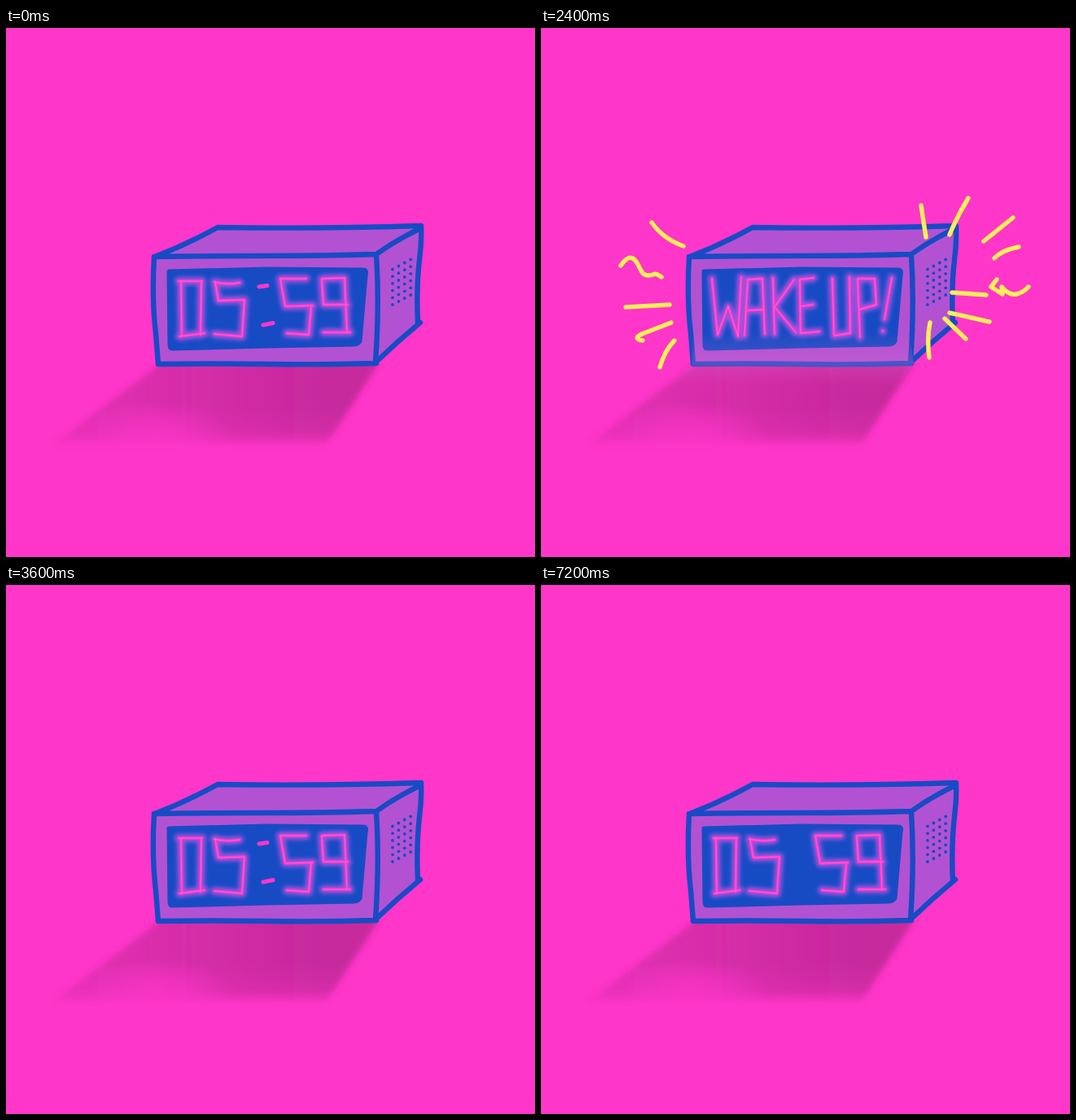
Write an HTML page that moves like this. It is 650x650 px and loops after 7.6 s.

```html
<!DOCTYPE html>
<html lang="en">
<head>
<meta charset="utf-8">
<title>Alarm clock</title>
<style>
  html, body { margin: 0; width: 100%; height: 100%; overflow: hidden; background: #ff36ca; }
  svg { display: block; width: 100%; height: 100%; }
  path { stroke-linecap: round; stroke-linejoin: round; }
  .line { fill: none; stroke: #174bc4; stroke-width: 6.4; }
  .halo { fill: none; stroke: #b455e2; stroke-width: 10; opacity: .85; }
  .neon { fill: none; stroke: #ff38ca; stroke-width: 3.4; }
  .core { fill: none; stroke: #ff7ddd; stroke-width: 1; opacity: .6; }
  .rays { fill: none; stroke: #ffee58; stroke-width: 5.4; }
</style>
</head>
<body>
<svg viewBox="0 0 650 650">
  <defs>
    <filter id="glow" filterUnits="userSpaceOnUse" x="190" y="290" width="260" height="110">
      <feGaussianBlur stdDeviation="2.6"/>
    </filter>
    <filter id="soft" filterUnits="userSpaceOnUse" x="20" y="380" width="480" height="170">
      <feGaussianBlur stdDeviation="3.5"/>
    </filter>
    <linearGradient id="shade" gradientUnits="userSpaceOnUse" x1="60" y1="0" x2="445" y2="0">
      <stop offset="0" stop-color="#c92a9f" stop-opacity=".5"/>
      <stop offset=".3" stop-color="#c92a9f" stop-opacity=".68"/>
      <stop offset=".55" stop-color="#c92a9f" stop-opacity=".85"/>
      <stop offset=".85" stop-color="#c7299d"/>
    </linearGradient>
    <linearGradient id="fall" gradientUnits="userSpaceOnUse" x1="0" y1="414" x2="0" y2="516">
      <stop offset="0" stop-color="#fff"/>
      <stop offset=".5" stop-color="#fff"/>
      <stop offset=".8" stop-color="#ccc"/>
      <stop offset="1" stop-color="#333"/>
    </linearGradient>
    <radialGradient id="thin">
      <stop offset="0" stop-opacity=".75"/>
      <stop offset=".4" stop-opacity=".5"/>
      <stop offset="1" stop-opacity="0"/>
    </radialGradient>
    <mask id="fade" maskUnits="userSpaceOnUse" x="20" y="380" width="480" height="170">
      <rect x="20" y="412" width="480" height="138" fill="url(#fall)"/>
      <ellipse cx="185" cy="502" rx="95" ry="44" fill="url(#thin)"/>
    </mask>
    <linearGradient id="mist" gradientUnits="userSpaceOnUse" x1="0" y1="375" x2="0" y2="441">
      <stop offset="0" stop-color="#dd6fd2" stop-opacity="0"/>
      <stop offset=".55" stop-color="#dd6fd2" stop-opacity=".27"/>
      <stop offset="1" stop-color="#e84fc6" stop-opacity="0"/>
    </linearGradient>
  </defs>

  <rect width="650" height="650" fill="#ff36ca"/>
  <g mask="url(#fade)">
    <path d="M186 404H461L455 417 394 512H58L186 415Z" fill="url(#shade)" filter="url(#soft)"/>
  </g>

  <path d="M183 281L260 245 510 243Q510 278 505 320L506 363 455 412 187 413Q180 350 183 281Z" fill="#b252d2"/>
  <path d="M200 299L320 296 439 297Q444 297 442 304L435 385Q433 389 427 389L320 391 204 394Q201 394 201 389Z"
        fill="#174bc4" stroke="#174bc4" stroke-width="5"/>
  <path class="line" d="M183 281Q222 266 260 245Q380 247 510 243
    M182 281Q250 280 320 280T455 278Q480 260 510 246
    M182 281Q179 335 184 375L187 413Q250 412 320 413T455 412
    M455 278Q459 340 454 411Q480 386 509 362
    M510 243Q511 262 508 285Q504 320 506 363"/>
  <g id="dots" fill="#174bc4"></g>

  <g id="time"></g>
  <path id="colon" d="M311 318L321 316.5M316 365L328 362.5" fill="none" stroke="#ff36ca" stroke-width="5"/>

  <g id="alarm">
    <g id="wake"></g>
    <path d="M187 375H452L458 412 436 441H152L185 414Z" fill="url(#mist)"/>
    <path class="rays" d="M136 239Q150 259 175 268
      M98 292C104 283 111 278 117 287S123 304 132 304S138 299 148 306
      M104 343L158 340M160 362L124 376C115 380 117 383 125 384M164 384Q152 396 146 417
      M467 218L473 257M525 209Q511 232 502 254M544 262L580 233M557 283Q566 273 587 269
      M560 309L553 318L567 327L566 318Q575 329 584 327T599 318
      M505 325L547 328M502 350L551 361M496 357L522 382M478 362Q474 380 477 405"/>
  </g>
</svg>

<script>
const LOOP = 7600, RING_START = 2000, RING_END = 3600;
const el = id => document.getElementById(id);

const digits = `M212 311H241M215 311L216 379M240 312L239 377M213 379L244 375
  M256 312Q270 316 287 313M257 312L261 335L293 334L290 379L256 376
  M369 308H337L343 342L377 341M375 342L372 377L345 375
  M416 307L388 308L390 340H420M416 307L419 374M390 374H423`;
const letters = `M210 308L217 377L230 342L242 379L246 306
  M250 378L254 309L272 308L275 376M253 347L274 346
  M285 307L287 376M311 309L287 343L313 374
  M335 307L318 309L319 375L342 373M319 342L334 340
  M358 308L360 378L380 375L379 306
  M392 380L389 308L410 308L412 340L391 346
  M431 307L422 358M420 372L420 373`;

function neon(id, d) {
  el(id).innerHTML = `<path class="halo" d="${d}" filter="url(#glow)"/>
    <path class="neon" d="${d}"/><path class="core" d="${d}"/>`;
}

function speaker() {
  let out = "";
  for (let col = 0; col < 4; col++)
    for (let row = 0; row < 6; row++)
      out += `<circle cx="${475 + col * 7.4}" cy="${296.5 - col * 4 + row * 8.7}" r="1.9"/>`;
  el("dots").innerHTML = out;
}

const show = (id, on) => { el(id).style.display = on ? "" : "none"; };

function draw(t) {
  const ringing = t >= RING_START && t < RING_END;
  const phase = t < RING_START ? t : t - RING_END;
  show("time", !ringing);
  show("colon", !ringing && Math.floor(phase / 400) % 2 === 0);
  // While ringing, the whole message flashes over an empty display.
  show("alarm", ringing && Math.floor((t - RING_START) / 200) % 2 === 0);
}

neon("time", digits);
neon("wake", letters);
speaker();

const start = performance.now();
function tick() {
  draw((performance.now() - start) % LOOP);
  requestAnimationFrame(tick);
}
tick();
</script>
</body>
</html>
```
